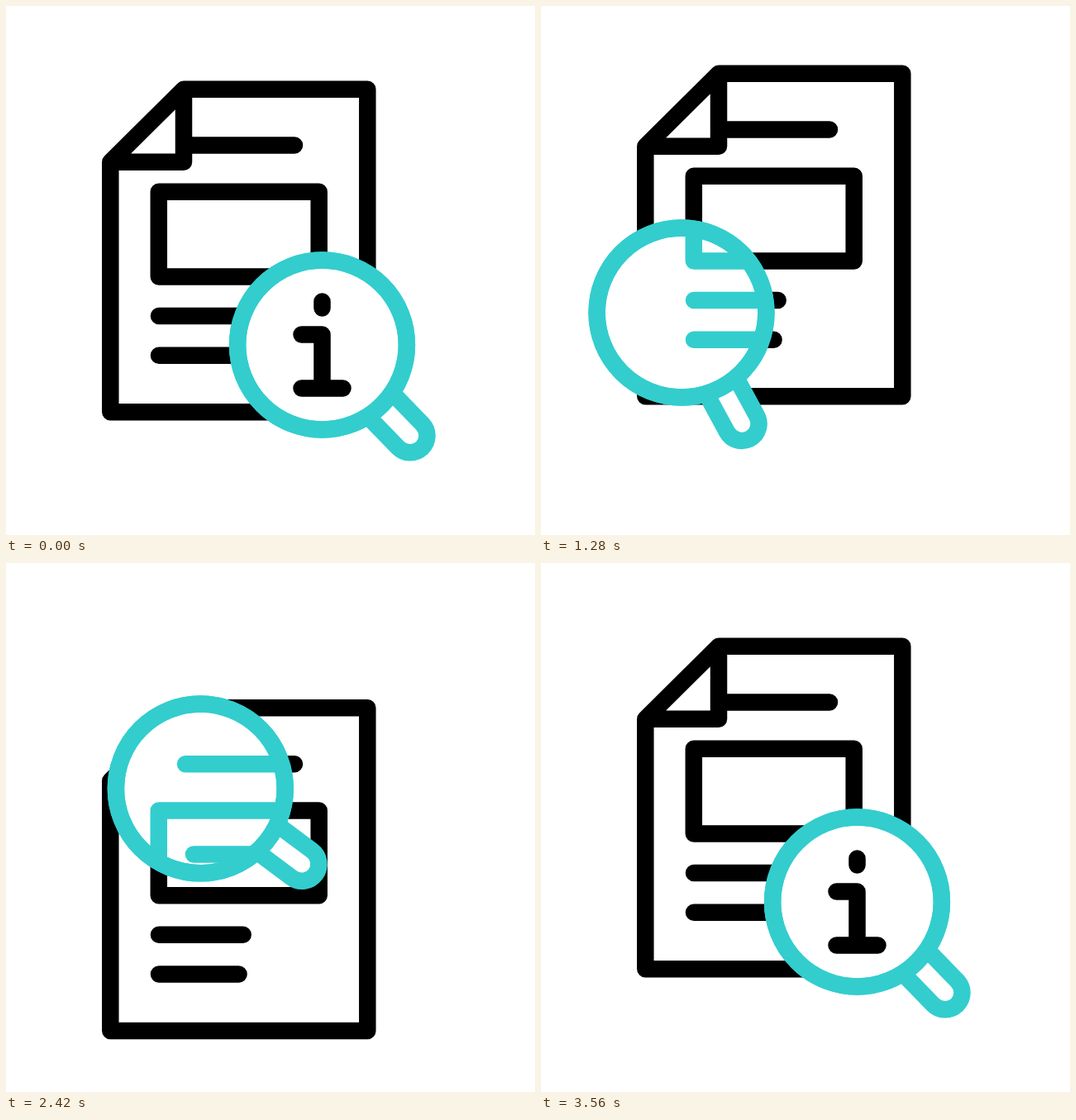
An HTML page that plays this animation: 640 by 640 pixels, repeating every 3.58 s.

```html
<!DOCTYPE html>
<html>
<head>
<meta charset="utf-8">
<style>
  html, body { margin: 0; width: 100%; height: 100%; overflow: hidden; background: #fff; }
  svg { display: block; width: 100vw; height: 100vh; }
  .line { fill: none; stroke-width: 20.5; stroke-linecap: round; stroke-linejoin: round; }
  .ink { stroke: #000; }
  .teal { stroke: #33cdce; }
  .solid { fill: #fff; }
  .route { fill: none; }
</style>
</head>
<body>
<svg viewBox="0 0 640 640">
  <defs>
    <clipPath id="glass"><circle id="hole" r="98"/></clipPath>
    <path id="rows" d="M217 168.5H349M184.8 224.8H378.7V327.6H184.8ZM185 375H286.7M185 422.8H281.6"/>
  </defs>

  <!-- The lens travels these routes over the page, one after the other. -->
  <g class="route">
    <path data-start="160" data-end="522" data-angle="104" d="M382.5 410L513.5 373"/>
    <path data-start="665" data-end="1275" data-angle="61.5" d="M513.5 373C400 368 175 362 170 390"/>
    <path data-start="1342" data-end="2267" data-angle="36.5" d="M170 390C170 345 205 250 220.5 198"/>
    <path data-start="2267" data-end="3150" data-angle="39" d="M220.5 198L404 201"/>
    <path data-start="3200" data-end="3560" data-angle="45.9" d="M404 201L382.5 410"/>
  </g>

  <g id="page" class="line ink">
    <path d="M215 100.7H437.3V491.3H126.3V188.8ZV188.8H126.3"/>
    <use href="#rows"/>
  </g>
  <g id="lens" class="line teal">
    <path id="handle" class="solid" d="M100 -20.5H153A20.5 20.5 0 0 1 153 20.5H100"/>
    <circle class="solid" r="102.4"/>
  </g>
  <g clip-path="url(#glass)">
    <g id="found" class="line teal">
      <use href="#rows"/>
      <path d="M227 277.8H324"/>
    </g>
  </g>
  <g id="rim" class="line">
    <circle class="teal" r="102.4"/>
    <path id="info" class="ink" d="M0 -52.4V-44.6M-25 -12.4H0V52.6M-25 52.6H25"/>
  </g>
</svg>
<script>
  const LOOP = 3580;
  const REST_ANGLE = 45.9;
  const el = id => document.getElementById(id);

  const legs = [...document.querySelectorAll('.route path')].map(route => ({
    route,
    start: +route.dataset.start,
    end: +route.dataset.end,
    angle: +route.dataset.angle,
    length: route.getTotalLength()
  }));

  // Eased progress from 0 to 1 between two times.
  function progress(t, start, end) {
    const s = Math.min(1, Math.max(0, (t - start) / (end - start)));
    return s * s * (3 - 2 * s);
  }

  // The page rises, sinks below its resting place, then returns.
  function pageOffset(t) {
    return -53 * progress(t, 212, 774)
      + 130.5 * progress(t, 774, 2290)
      - 77.5 * progress(t, 2290, 3426);
  }

  function lensPose(t) {
    const i = Math.max(0, legs.findLastIndex(leg => t >= leg.start));
    const leg = legs[i];
    const from = i ? legs[i - 1].angle : REST_ANGLE;
    const p = progress(t, leg.start, leg.end);
    const { x, y } = leg.route.getPointAtLength(p * leg.length);
    return { x, y, angle: from + (leg.angle - from) * p };
  }

  function move(id, x, y) {
    el(id).setAttribute('transform', `translate(${x} ${y})`);
  }

  function draw(t) {
    const { x, y, angle } = lensPose(t);
    const pageY = pageOffset(t);
    const first = legs[0], last = legs[legs.length - 1];
    const searching = progress(t, first.start, first.end) - progress(t, last.start, last.end);

    move('page', 0, pageY);
    move('found', 0, pageY);
    for (const id of ['lens', 'rim', 'hole']) move(id, x, y + pageY);
    el('handle').setAttribute('transform', `rotate(${angle})`);
    el('info').setAttribute('opacity', 1 - searching);
    el('found').setAttribute('opacity', searching);
  }

  const begin = performance.now();
  function tick() {
    draw((performance.now() - begin) % LOOP);
    requestAnimationFrame(tick);
  }
  tick();
</script>
</body>
</html>
```
